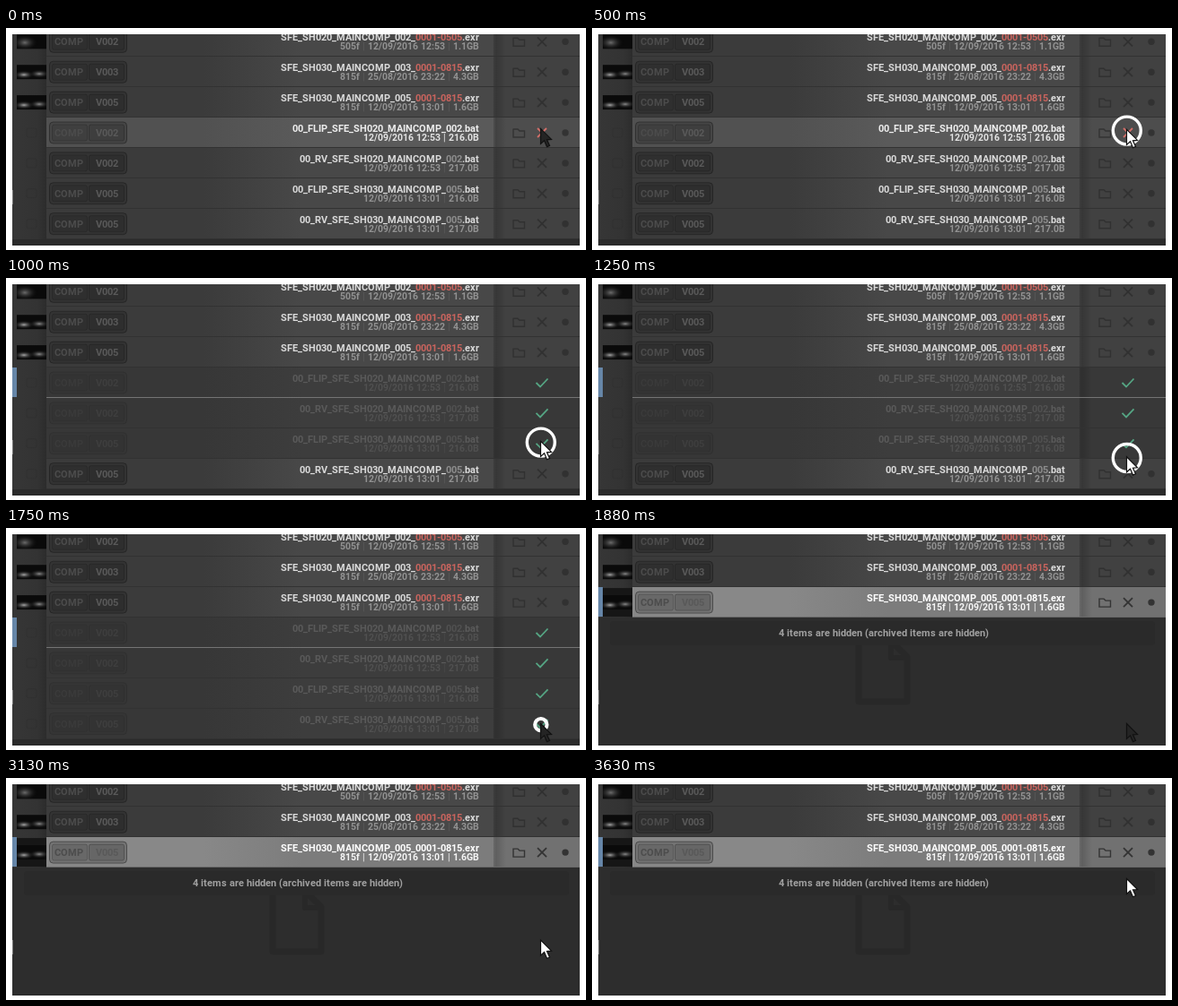
Recreate the animation shown at these times as an HTML page with a canvas. Size 646 by 248 pixels, loop 3.76 s.

```html
<!DOCTYPE html>
<html>
<head>
<meta charset="utf-8">
<style>
html, body { margin: 0; width: 100%; height: 100%; overflow: hidden; background: #fff; }
canvas { display: block; width: 646px; height: 248px; }
</style>
</head>
<body>
<canvas id="stage" width="646" height="248"></canvas>
<script>
const ctx = document.getElementById('stage').getContext('2d');
const LOOP = 3760, STEP = 125, PITCH = 33.9;
const LEFT = 7, TOP = 7, RIGHT = 639, BOTTOM = 243, LIST = 45, ICONS = 545;

// name parts: before, highlighted part, after
const rows = [
  ['SFE_SH020_MAINCOMP_002_', '0001-0505', '.exr', '505f | 12/09/2016 12:53 | 1.1GB', 'V002'],
  ['SFE_SH030_MAINCOMP_003_', '0001-0815', '.exr', '815f | 25/08/2016 23:22 | 4.3GB', 'V003'],
  ['SFE_SH030_MAINCOMP_005_', '0001-0815', '.exr', '815f | 12/09/2016 13:01 | 1.6GB', 'V005'],
  ['00_FLIP_SFE_SH020_MAINCOMP_', '002', '.bat', '12/09/2016 12:53 | 216.0B', 'V002'],
  ['00_RV_SFE_SH020_MAINCOMP_', '002', '.bat', '12/09/2016 12:53 | 217.0B', 'V002'],
  ['00_FLIP_SFE_SH030_MAINCOMP_', '005', '.bat', '12/09/2016 13:01 | 216.0B', 'V005'],
  ['00_RV_SFE_SH030_MAINCOMP_', '005', '.bat', '12/09/2016 13:01 | 217.0B', 'V005']
].map(([head, mark, tail, meta, version]) => ({ head, mark, tail, meta, version, isImage: tail === '.exr' }));

const archiveStep = { 3: 6, 4: 7, 5: 8, 6: 11 };
const PRESS = 3, RELEASE = 14, HIDE = 15;

const looks = {
  normal:   { bg: ['#3b3b3b', '#484848', '#414141'], name: '#dadada', meta: '#929292', bar: '#585858', label: 1, icon: '#313131' },
  hover:    { bg: ['#515151', '#5a5a5a', '#4d4d4d'], name: '#eeeeee', meta: '#e2e2e2', bar: '#d8d8d8', label: 1, icon: '#333333' },
  archived: { bg: ['#373737', '#3d3d3d', '#383838'], name: '#5a5a5a', meta: '#505050', bar: '#484848', label: 0.3, icon: null },
  selected: { bg: ['#888888', '#7c7c7c', '#717171'], name: '#ffffff', meta: '#f5f5f5', bar: '#e0e0e0', label: 1, icon: '#333333' }
};

const smooth = p => { p = Math.min(1, Math.max(0, p)); return p * p * (3 - 2 * p); };

function rect(x, y, w, h, fill) {
  ctx.fillStyle = fill;
  ctx.fillRect(x, y, w, h);
}

function rounded(x, y, w, h, r, fill, stroke) {
  ctx.beginPath();
  ctx.roundRect(x, y, w, h, r);
  if (fill) { ctx.fillStyle = fill; ctx.fill(); }
  if (stroke) { ctx.strokeStyle = stroke; ctx.lineWidth = 1; ctx.stroke(); }
}

function line(points, color, width) {
  ctx.beginPath();
  points.forEach(([x, y]) => ctx.lineTo(x, y));
  ctx.strokeStyle = color;
  ctx.lineWidth = width;
  ctx.stroke();
}

function font(size) {
  ctx.font = `700 ${size}px Roboto, sans-serif`;
}

// Text is set on the pixel grid: every glyph advances by whole pixels
const advance = ch => Math.round(ctx.measureText(ch).width);
const widthOf = str => [...str].reduce((sum, ch) => sum + advance(ch), 0);

function text(str, x, y, color) {
  ctx.fillStyle = color;
  for (const ch of str) {
    ctx.fillText(ch, x, y);
    x += advance(ch);
  }
}

function centered(str, x, y, color) {
  text(str, Math.round(x - widthOf(str) / 2), y, color);
}

// Draws [string, color] parts so that the last one ends at x
function partsEndingAt(parts, x, y) {
  for (const [str, color] of [...parts].reverse()) {
    x -= widthOf(str);
    text(str, x, y, color);
  }
}

function blend(x0, x1, stops) {
  const g = ctx.createLinearGradient(x0, 0, x1, 0);
  stops.forEach(([at, color]) => g.addColorStop(at, color));
  return g;
}

// Soft elliptical light
function glow(x, y, rx, ry, color) {
  ctx.save();
  ctx.translate(x, y);
  ctx.scale(rx, ry);
  const g = ctx.createRadialGradient(0, 0, 0, 0, 0, 1);
  g.addColorStop(0, color);
  g.addColorStop(1, 'rgba(0,0,0,0)');
  rect(-1, -1, 2, 2, g);
  ctx.restore();
}

function thumbnail(c, index, selected) {
  const y = c - 8;
  if (selected) rect(12, c - 16, 33, 32, '#161616');
  rect(12, y, 33, 16, '#0a0a0a');
  ctx.save();
  ctx.beginPath();
  ctx.rect(12, y, 33, 16);
  ctx.clip();
  if (index === 0) {
    glow(21, c + 1, 15, 9, '#6c6c6c');
  } else {
    glow(20, c + 3, 12, 5, '#a8a8a8');
    glow(37, c + 2, 12, 5, '#8a8a8a');
  }
  ctx.restore();
}

function label(c, version, opacity) {
  const shade = k => `rgba(18,18,18,${k})`;
  ctx.save();
  ctx.globalAlpha = opacity;
  rounded(48.5, c - 12, 86, 24, 4, shade(0.18), shade(0.45));
  rounded(51.5, c - 9, 39, 18, 2, shade(0.1), shade(0.22));
  rounded(92.5, c - 9, 39, 18, 2, shade(0.13), shade(0.28));
  font(11);
  centered('COMP', 70, Math.round(c + 4), '#4c4c4c');
  centered(version, 112.5, Math.round(c + 4), '#595959');
  ctx.restore();
}

function icons(c, color, crossColor) {
  line([[565, c - 4], [570, c - 4], [572, c - 2], [577.5, c - 2], [577.5, c + 5], [565, c + 5], [565, c - 4.5]], color, 1.4);
  line([[592, c - 5], [602, c + 5]], crossColor, 1.8);
  line([[602, c - 5], [592, c + 5]], crossColor, 1.8);
  ctx.beginPath();
  ctx.arc(623, c, 3.7, 0, 7);
  ctx.fillStyle = color;
  ctx.fill();
}

function drawRow(row, index, state) {
  const c = 15.3 + PITCH * index;
  const top = Math.max(TOP, Math.round(c - PITCH / 2));
  const height = Math.round(c + PITCH / 2) - top;
  const look = looks[state];
  const [left, middle, right] = look.bg;

  rect(LEFT, top, LIST - LEFT, height, blend(LEFT, LIST, [[0, '#363636'], [0.75, '#333333'], [1, '#2c2c2c']]));
  rect(LIST, top, ICONS - LIST, height, blend(LIST, ICONS, [[0, left], [0.35, left], [0.57, middle], [1, middle]]));
  rect(ICONS, top, RIGHT - ICONS, height, right);
  rect(ICONS - 2, top, 14, height, blend(ICONS - 2, ICONS + 12, [[0, 'rgba(0,0,0,.2)'], [1, 'rgba(0,0,0,0)']]));
  rect(LIST, top + height - 1, RIGHT - LIST, 1, state === 'selected' ? '#686868' : '#323232');

  if (row.isImage) thumbnail(c, index, state === 'selected');
  else rounded(23, c - 5, 11, 10, 2, null, '#303030');

  label(c, row.version, look.label);

  const markColor = state === 'normal' ? (row.isImage ? '#c9645e' : '#8d8d8d')
    : state === 'archived' ? '#515151' : look.name;
  font(11);
  partsEndingAt([[row.head, look.name], [row.mark, markColor], [row.tail, look.name]], 527, Math.round(c - 1));
  font(10.5);
  partsEndingAt(row.meta.split(/(\|)/).map(s => [s, s === '|' ? look.bar : look.meta]), 527, Math.round(c + 9));

  if (state === 'archived') line([[590.5, c], [595, c + 4.5], [603.5, c - 4.5]], '#55a583', 1.8);
  else icons(c, look.icon, state === 'hover' ? '#d66f69' : look.icon);

  if (state === 'selected' || (state === 'archived' && index === 3)) {
    rect(LEFT, top, 5, height - 1, '#6686a8');
    if (state === 'archived') rect(LIST, top + height - 1, RIGHT - LIST, 1, '#747474');
  }
}

function placeholder() {
  rect(LEFT, 100, RIGHT - LEFT, BOTTOM - 100, '#2d2d2d');
  ctx.lineJoin = 'round';
  line([[297, 127], [334, 127], [351, 144], [351, 194], [297, 194], [297, 127]], '#282828', 7);
  line([[333, 127], [333, 145], [351, 145]], '#282828', 6);
  ctx.lineJoin = 'miter';
  rounded(20, 104, 607, 27, 4, '#2a2a2a');
  font(11);
  centered('4 items are hidden (archived items are hidden)', 324.5, 121, '#a0a0a0');
}

function pointerY(step) {
  if (step < 6) return 112.4 + Math.max(0, step - 3);
  if (step === 6) return 118;
  if (step <= 12) return 175 + 43.5 * Math.pow((step - 7) / 5, 1.1);
  return 218.5 - 106 * smooth((step - 23) / 5);
}

function pointer(step) {
  const x = 595.5, y = pointerY(step);
  const dark = step <= PRESS || step === RELEASE || step === HIDE;
  if (step >= PRESS && step <= RELEASE) {
    const small = step === PRESS || step === RELEASE;
    ctx.beginPath();
    ctx.arc(x + 0.3, y + 1.2, small ? 6.7 : 15.5, 0, 7);
    ctx.strokeStyle = '#fff';
    ctx.lineWidth = small ? 4 : 3.4;
    ctx.stroke();
  }
  const shape = [[0, 0], [0, 17], [4, 13.4], [7, 20.3], [10, 19], [7, 12.4], [12, 12]];
  ctx.beginPath();
  shape.forEach(([dx, dy]) => ctx.lineTo(x + dx, y + dy));
  ctx.closePath();
  ctx.fillStyle = dark ? '#242424' : '#fff';
  ctx.strokeStyle = '#111';
  ctx.lineWidth = 1.2;
  ctx.fill();
  ctx.stroke();
}

function rowState(index, step) {
  if (step >= HIDE) return index === 2 ? 'selected' : 'normal';
  if (step >= archiveStep[index]) return 'archived';
  return index === 3 ? 'hover' : 'normal';
}

function draw(step) {
  rect(0, 0, 646, 248, '#fff');
  ctx.save();
  ctx.beginPath();
  ctx.rect(LEFT, TOP, RIGHT - LEFT, BOTTOM - TOP);
  ctx.clip();
  rect(LEFT, TOP, RIGHT - LEFT, BOTTOM - TOP, '#2b2b2b');
  const hidden = step >= HIDE;
  if (hidden) placeholder();
  rows.slice(0, hidden ? 3 : rows.length).forEach((row, i) => drawRow(row, i, rowState(i, step)));
  rect(LEFT, 181, 1, 16, '#777777');
  pointer(step);
  ctx.restore();
}

function tick(now) {
  draw(Math.min(29, Math.floor((now % LOOP) / STEP)));
  requestAnimationFrame(tick);
}
requestAnimationFrame(tick);
</script>
</body>
</html>
```
